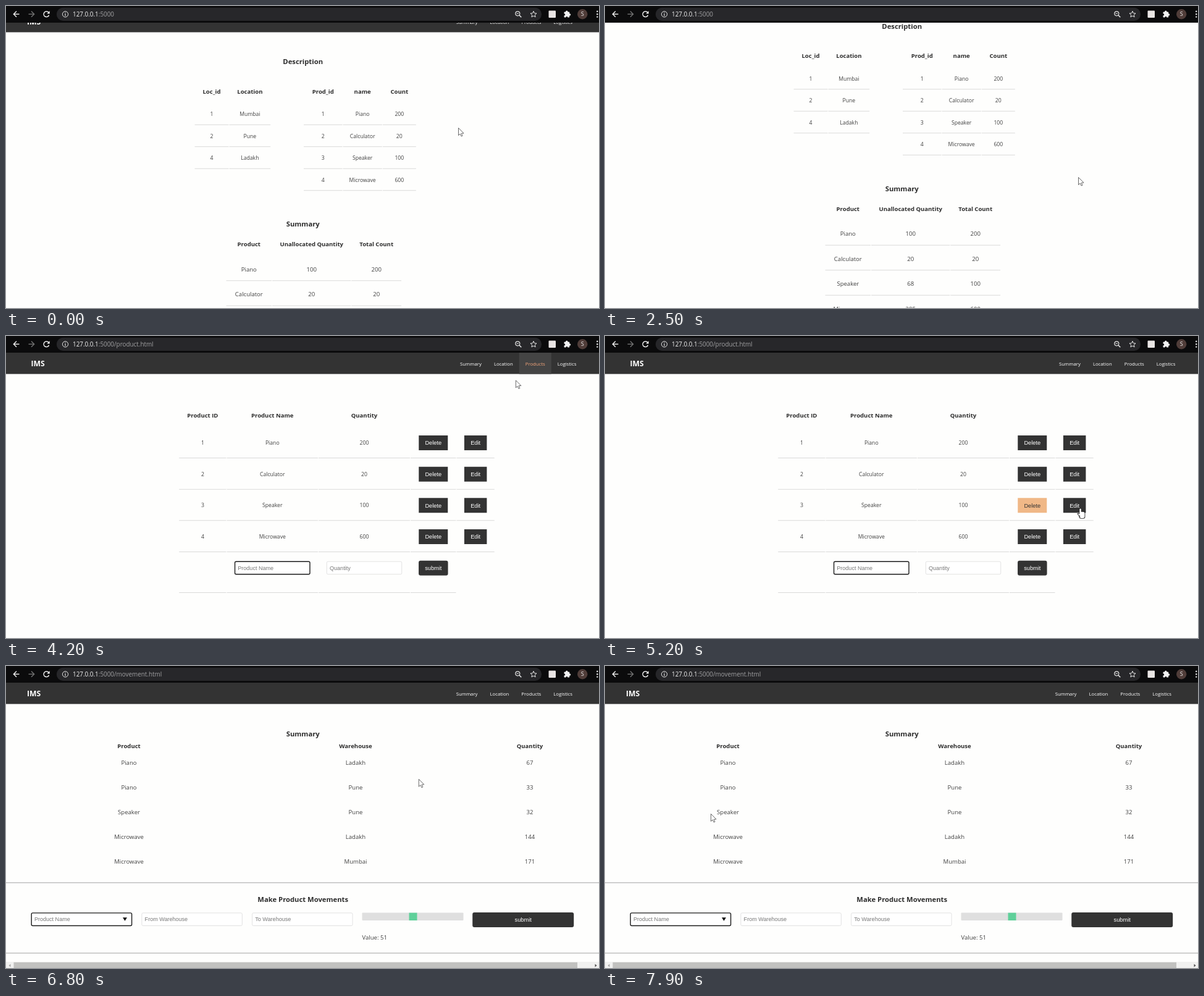
Write an HTML page with a canvas that moves like this. It is 960x489 px and loops after 8000 ms.

```html
<!DOCTYPE html>
<html lang="en">
<head>
<meta charset="utf-8">
<title>IMS</title>
<style>
html, body { margin: 0; width: 100%; height: 100%; overflow: hidden; background: #fefefd; }
canvas { display: block; width: 960px; height: 489px; }
</style>
</head>
<body>
<canvas id="stage" width="960" height="489"></canvas>
<script>
const ctx = document.getElementById('stage').getContext('2d');
const LOOP = 8000, STEP = 100;
const SANS = '"Open Sans", "Noto Sans", sans-serif';
const ARIAL = '"Liberation Sans", Arial, sans-serif';
const DARK = '#333333', INK = '#404040', HOT = '#f0b887', ICON = '#e8e8e8';
const SMALL = 8.65, BODY = 9.55, TITLE = 11.25;
const TO_PRODUCTS = 3800, TO_LOGISTICS = 6200;

// Stops of the mouse: time, x, y
const STOPS = [
  [0, 732, 197], [2500, 766, 277], [3400, 836, 51.5], [4000, 836, 51.5],
  [5100, 708, 279], [5200, 769.5, 279.5], [5400, 769.5, 279.5],
  [5900, 907, 47], [6200, 907, 47], [6500, 715, 171], [7200, 595, 201], [7900, 171, 239]
];

function ramp(t, from, to) {
  const u = Math.min(1, Math.max(0, (t - from) / (to - from)));
  return u * u * (3 - 2 * u);
}

const homeScroll = t => 19 + 96 * ramp(t, 0, 1000) - 38.5 * ramp(t, 1700, 2100) - 76.5 * ramp(t, 2500, 2700);
const logScroll = t => 44 * (ramp(t, 7000, 7400) - ramp(t, 7500, 7700));

function mouseAt(t) {
  let [last, x, y] = STOPS[0];
  for (const [time, nx, ny] of STOPS.slice(1)) {
    const u = ramp(t, last, time);
    x += (nx - x) * u;
    y += (ny - y) * u;
    last = time;
  }
  return { x, y };
}

const inside = (p, x, y, w, h) => p && p.x >= x && p.x <= x + w && p.y >= y && p.y <= y + h;

function paint({ fill, stroke, lw = 1 }) {
  if (fill) { ctx.fillStyle = fill; ctx.fill(); }
  if (stroke) { ctx.strokeStyle = stroke; ctx.lineWidth = lw; ctx.stroke(); }
}

function box(x, y, w, h, style, r = 0) {
  ctx.beginPath();
  ctx.roundRect(x, y, w, h, r);
  paint(typeof style === 'string' ? { fill: style } : style);
}

function circle(x, y, r, style, from = 0, to = Math.PI * 2) {
  ctx.beginPath();
  ctx.arc(x, y, r, from, to);
  paint(style);
}

function path(pts, style, close) {
  ctx.beginPath();
  for (const [x, y] of pts) ctx.lineTo(x, y);
  if (close) ctx.closePath();
  paint(style);
}

function text(str, x, y, size, { bold, color = INK, align = 'center', face = SANS } = {}) {
  ctx.font = `${bold ? 700 : 400} ${size}px ${face}`;
  ctx.textAlign = align;
  ctx.fillStyle = color;
  ctx.fillText(str, x, y + size * 0.355);
  return ctx.measureText(str).width;
}

const head = (str, x, y, size = BODY) => text(str, x, y, size, { bold: true, color: '#2c2c2c' });
const middle = (edges, i) => (edges[i] + edges[i + 1]) / 2;

function rule(edges, y) {
  for (let i = 1; i < edges.length; i++) {
    box(edges[i - 1] + 0.5, y - 0.5, edges[i] - edges[i - 1] - 1, 1, '#d9d9d9');
  }
}

// drop is the gap from a row's middle to its underline
function table({ edges, heads, headY, rows, y, pitch, drop, size }) {
  heads.forEach((label, i) => head(label, middle(edges, i), headY));
  rows.forEach((row, r) => {
    const ry = y + r * pitch;
    row.forEach((cell, i) => text(cell, middle(edges, i), ry, size));
    if (drop) rule(edges, ry + drop);
  });
}

function nav(shift, mouse) {
  box(0, 27, 960, 34.5, DARK);
  text('IMS', 34 + shift, 45, 12.2, { bold: true, color: '#fff', align: 'left' });
  let right = 917 + shift;
  for (const label of ['Logistics', 'Products', 'Location', 'Summary']) {
    ctx.font = `400 7.75px ${SANS}`;
    const w = ctx.measureText(label).width;
    const hot = inside(mouse, right - w - 10, 27, w + 20, 34);
    if (hot) box(right - w - 10, 27, w + 20, 34.5, '#444444');
    text(label, right, 45, 7.75, { color: hot ? '#f4a57a' : '#fff', align: 'right' });
    right -= w + 20;
  }
}

function home(t, mouse) {
  ctx.save();
  ctx.translate(0, -homeScroll(t));
  nav(0, mouse);
  head('Description', 480.7, 109.5, TITLE);
  const upper = { headY: 157.3, y: 194.3, pitch: 35.5, drop: 17, size: SMALL };
  table({
    ...upper, edges: [305, 361, 428.7], heads: ['Loc_id', 'Location'],
    rows: [[1, 'Mumbai'], [2, 'Pune'], [4, 'Ladakh']]
  });
  table({
    ...upper, edges: [481.5, 545, 609.3, 664.3], heads: ['Prod_id', 'name', 'Count'],
    rows: [[1, 'Piano', 200], [2, 'Calculator', 20], [3, 'Speaker', 100], [4, 'Microwave', 600]]
  });
  head('Summary', 480.7, 372.3, TITLE);
  table({
    edges: [356, 430.6, 558.8, 640.5], heads: ['Product', 'Unallocated Quantity', 'Total Count'],
    headY: 405, y: 445.2, pitch: 40.55, drop: 18.5, size: BODY,
    rows: [['Piano', 100, 200], ['Calculator', 20, 20], ['Speaker', 68, 100], ['Microwave', 285, 600]]
  });
  ctx.restore();
}

function button(label, x, y, w, { mouse, r = 0 } = {}) {
  const hot = inside(mouse, x, y, w, 24);
  box(x, y, w, 24, hot ? HOT : DARK, r);
  text(label, x + w / 2, y + 12, 9.25, { color: hot ? DARK : '#fff', face: ARIAL });
}

function field(hint, x, y, w, focus) {
  const style = focus ? { fill: '#fff', stroke: '#1a1a1a', lw: 1.4 } : { fill: '#fff', stroke: '#e2e2e2' };
  box(x + 0.8, y + 0.9, w - 1.6, 20.6, style, 2);
  text(hint, x + 5.5, y + 11, 9.05, { color: '#777', align: 'left', face: ARIAL });
}

function products(mouse) {
  nav(6.4, mouse);
  const edges = [279.7, 357, 505.5, 654.5, 729, 791.2];
  const rows = [[1, 'Piano', 200], [2, 'Calculator', 20], [3, 'Speaker', 100], [4, 'Microwave', 600]];
  const y = 173, pitch = 50.65;
  table({
    edges, rows, y, pitch, heads: ['Product ID', 'Product Name', 'Quantity'],
    headY: 128.5, drop: 24.5, size: SMALL
  });
  rows.forEach((_, i) => {
    const top = y + i * pitch - 12;
    button('Delete', middle(edges, 3) - 23.5, top, 47, { mouse });
    button('Edit', middle(edges, 4) - 18.2, top, 36.5, { mouse });
  });
  field('Product Name', middle(edges, 1) - 61.5, 364.3, 123, true);
  field('Quantity', middle(edges, 2) - 61.5, 364.3, 123);
  button('submit', middle(edges, 3) - 23.7, 363.7, 47.5, { r: 3 });
  rule(edges.slice(0, 5), 415.5);
}

function logistics(t, mouse) {
  ctx.save();
  ctx.translate(0, -logScroll(t));
  nav(0, mouse);
  head('Summary', 480.7, 110, TITLE);
  table({
    edges: [8, 390, 742, 954], heads: ['Product', 'Warehouse', 'Quantity'],
    headY: 129.5, y: 157, pitch: 40, size: BODY,
    rows: [['Piano', 'Ladakh', 67], ['Piano', 'Pune', 33], ['Speaker', 'Pune', 32],
      ['Microwave', 'Ladakh', 144], ['Microwave', 'Mumbai', 171]]
  });
  for (const y of [350.2, 464.2]) box(0, y, 960, 1.2, '#b4b4b4');
  head('Make Product Movements', 480.7, 378, TITLE);

  const col = i => 40.4 + i * 178.7, w = 164;
  field('Product Name', col(0), 399, w, true);
  path([[189, 407.3], [196, 407.3], [192.5, 412.7]], { fill: '#111' }, true);
  if (Math.floor((t - TO_LOGISTICS) / 530) % 2 === 0) box(46, 405, 1, 11, '#111');
  field('From Warehouse', col(1), 399, w);
  field('To Warehouse', col(2), 399, w);
  box(col(3), 399.6, w, 12.4, '#dfdfdf', 1);
  box(col(3) + w / 2 - 6, 399.6, 13, 12.4, '#5fd09a');
  text('Value: 51', col(3), 440, BODY, { align: 'left' });
  button('submit', col(4), 399, w, { r: 3 });
  head('Logistics History', 480.7, 492.2, TITLE);
  ctx.restore();

  box(0, 479, 960, 10, '#f1f1f0');
  box(12.5, 479.8, 912.5, 9.2, '#c1c1bf');
  path([[7.5, 482.5], [4.5, 485], [7.5, 487.5]], { fill: '#a5a5a5' }, true);
  path([[953.5, 482.5], [956.5, 485], [953.5, 487.5]], { fill: '#505050' }, true);
}

function arrow(x, dir, color) {
  const style = { stroke: color, lw: 1.4 };
  path([[x - 5 * dir, 13.2], [x + 4.5 * dir, 13.2]], style);
  path([[x, 8.6], [x - 4.6 * dir, 13.2], [x, 17.8]], style);
}

function browser(url, loading) {
  box(0, 0, 960, 27, '#0b0b0c');
  box(82, 2.7, 785, 21.3, '#27272a', 10.6);
  arrow(17, 1, '#f2f2f2');
  arrow(41, -1, '#737373');

  const line = { stroke: '#f2f2f2', lw: 1.5 };
  if (loading) {
    for (const d of [-4.4, 4.4]) path([[65.6 - d, 8.8], [65.6 + d, 17.6]], line);
  } else {
    circle(65.5, 13.2, 4.4, line, 0.4, 5.6);
    path([[70.7, 8], [70.7, 12.4], [66.3, 12.4]], { fill: '#f2f2f2' }, true);
  }

  circle(96, 13.3, 4.6, { stroke: ICON });
  box(95.4, 12.5, 1.2, 3.4, ICON);
  box(95.4, 10.4, 1.2, 1.2, ICON);
  const w = text('127.0.0.1', 108, 13.4, 9.9, { color: '#f1f1f1', align: 'left' });
  text(':5000' + url, 108 + w, 13.4, 9.9, { color: '#a0a0a2', align: 'left' });

  circle(828.3, 12.3, 3.5, { stroke: ICON, lw: 1.2 });
  path([[831, 15], [834.3, 18.2]], { stroke: ICON, lw: 1.5 });
  path([[826.6, 12.3], [830, 12.3]], { stroke: ICON });
  const star = Array.from({ length: 10 }, (_, i) => {
    const a = (i / 5 - 0.5) * Math.PI, r = i % 2 ? 2.4 : 5.3;
    return [854 + r * Math.cos(a), 13.6 + r * Math.sin(a)];
  });
  path(star, { stroke: ICON }, true);

  box(878.5, 7.5, 11.5, 11.5, loading ? '#777777' : '#e9e5e4', 1);
  box(903.5, 9.6, 8.7, 8.9, '#f2f2f2', 1);
  circle(907.8, 9.3, 1.7, { fill: '#f2f2f2' });
  circle(912.5, 14, 1.7, { fill: '#f2f2f2' });
  circle(903.8, 14, 1.4, { fill: '#0b0b0c' });
  circle(907.8, 18.3, 1.4, { fill: '#0b0b0c' });
  circle(933.2, 13.2, 8.2, { fill: '#503d39' });
  text('S', 933.2, 13.2, 9, { color: '#eee' });
  for (let i = -1; i <= 1; i++) circle(957.2, 13.2 + i * 4.4, 1.2, { fill: '#f2f2f2' });
}

function status(url) {
  const label = '127.0.0.1:5000' + url;
  ctx.font = `400 8.45px ${SANS}`;
  box(-3, 475.5, ctx.measureText(label).width + 14, 17, '#101011', 3);
  text(label, 4, 483, 8.45, { color: '#f0f0f0', align: 'left' });
}

function pointer({ x, y }, hand) {
  ctx.save();
  ctx.translate(x, y);
  ctx.lineJoin = 'round';
  if (hand) {
    const palm = new Path2D();
    palm.roundRect(-1.2, 0, 2.5, 11, 1.2);
    palm.roundRect(-1.2, 5.2, 8.2, 10.2, 2.4);
    palm.moveTo(-1, 9);
    palm.lineTo(-4.2, 8);
    palm.lineTo(0, 14.5);
    ctx.strokeStyle = '#222';
    ctx.lineWidth = 1.7;
    ctx.stroke(palm);
    ctx.fillStyle = '#fff';
    ctx.fill(palm);
  } else {
    path([[0.5, 0.5], [0.5, 12.5], [3.2, 10], [5.1, 14], [7, 13.2], [5.2, 9.3], [9, 9.1]],
      { fill: '#fff', stroke: '#444', lw: 0.8 }, true);
  }
  ctx.restore();
}

function draw(t) {
  const page = t < TO_PRODUCTS ? 0 : t < TO_LOGISTICS ? 1 : 2;
  const mouse = mouseAt(t), late = mouseAt(Math.max(0, t - STEP));
  box(0, 0, 960, 489, '#fefefd');
  if (page === 0) home(t, t > 2800 && late);
  else if (page === 1) products(late);
  else logistics(t, t < TO_LOGISTICS + 200 && late);

  const urls = ['', '/product.html', '/movement.html'];
  const opens = [0, TO_PRODUCTS, TO_LOGISTICS];
  const next = opens.findIndex((at, i) => i && t >= at - 300 && t < at + 100);
  browser(urls[next > 0 ? next : page], next > 0);
  opens.forEach((at, i) => {
    if (i && t >= at - 300 && t < at + 100) status(urls[i]);
  });

  const overNav = t > 2800 && inside(mouse, 719, 27, 215, 34);
  const overButtons = page === 1 && inside(mouse, 668, 161, 111, 176);
  pointer(mouse, overNav || overButtons);
}

const start = performance.now();
function tick(now) {
  const t = Math.max(0, now - start) % LOOP;
  draw(Math.floor(t / STEP) * STEP);
  requestAnimationFrame(tick);
}
draw(0);
requestAnimationFrame(tick);
</script>
</body>
</html>
```
